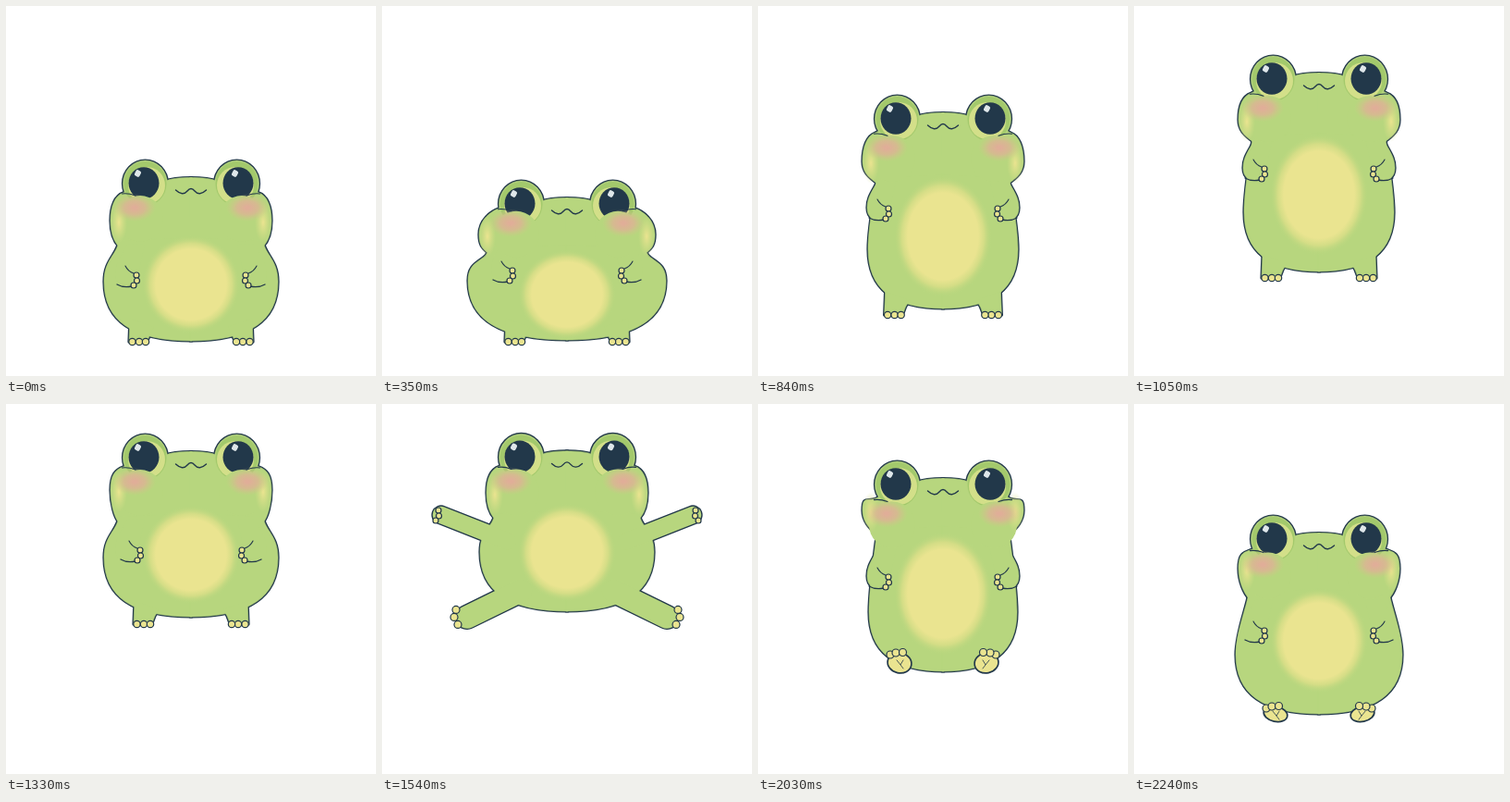
These frames come from a looping animation (400 px wide and 400 px high, 2.31 s). An HTML page:

```html
<!DOCTYPE html>
<html lang="en">
<head>
<meta charset="utf-8">
<title>Jumping frog</title>
<style>
html, body { margin: 0; width: 100%; height: 100%; overflow: hidden; background: #fff; }
svg { display: block; width: 100vw; height: 100vh; }
</style>
</head>
<body>
<svg viewBox="0 0 400 400" stroke-linecap="round" stroke-linejoin="round">
  <defs>
    <radialGradient id="belly">
      <stop offset=".72" stop-color="#eae490"/>
      <stop offset=".84" stop-color="#d4dd86"/>
      <stop offset="1" stop-color="#b7d67e" stop-opacity="0"/>
    </radialGradient>
    <radialGradient id="blush">
      <stop offset=".1" stop-color="#e0ae98"/>
      <stop offset=".5" stop-color="#dcb494" stop-opacity=".8"/>
      <stop offset="1" stop-color="#d2c489" stop-opacity="0"/>
    </radialGradient>
    <radialGradient id="glow">
      <stop offset="0" stop-color="#ebe490"/>
      <stop offset="1" stop-color="#d8df88" stop-opacity="0"/>
    </radialGradient>
  </defs>
  <g id="frog"></g>
</svg>
<script>
const LOOP = 2310, STEP = 70;
const INK = '#22384a', GREEN = '#b7d67e', CREAM = '#eae490';
const frog = document.getElementById('frog');

// time, eye top, cheek y, neck y, body half width, body bottom, belly y, hand y, foot y
const poses = [
  [70, 167, 232, 260, 94, 362, 301, 296, 363],
  [350, 189, 247, 268, 107, 361, 312, 291, 363],
  [560, 198, 255, 274, 119, 362, 317, 292, 364],
  [700, 146, 217, 244, 92, 361, 293, 272, 363],
  [770, 119, 190, 215, 84, 347, 270, 246, 352],
  [840, 97, 168, 192, 81, 327, 249, 224, 334],
  [1050, 54, 123, 147, 81, 287, 204, 181, 294],
  [1330, 33, 93, 128, 94, 230, 163, 163, 238],
  [1680, 32, 98, 122, 94, 220, 159, 155, 222],
  [1750, 38, 105, 125, 94, 221, 162, 155, 213],
  [2030, 62, 115, 142, 80, 289, 205, 192, 269],
  [2170, 97, 151, 182, 85, 322, 238, 227, 315],
  [2240, 121, 178, 210, 90, 335, 256, 250, 327]
];

const mix = (a, b, k) => a + (b - a) * k;

function poseAt(t) {
  if (t <= poses[0][0]) return poses[0];
  const i = poses.findIndex(row => row[0] >= t);
  const a = poses[i - 1], b = poses[i];
  const k = (t - a[0]) / (b[0] - a[0]);
  return a.map((v, n) => mix(v, b[n], k));
}

const ellipse = (x, y, rx, ry, style) =>
  `<ellipse cx="${x}" cy="${y}" rx="${rx}" ry="${ry}" ${style}/>`;
const path = (d, style) => `<path d="${d}" ${style}/>`;
const line = (d, w = 1.3) => path(d, `fill="none" stroke="${INK}" stroke-width="${w}"`);
const toe = (x, y, r) =>
  ellipse(x, y, r, r, `fill="${CREAM}" stroke="${INK}" stroke-width="1.2"`);
const bothSides = s => s + `<g transform="matrix(-1 0 0 1 400 0)">${s}</g>`;

function draw(t) {
  const [, top, cheekY, neckY, wide, bottom, bellyY, hand, foot] = poseAt(t);
  const squash = wide - 94;
  const cheek = 87 + Math.max(0, squash) * .62;
  const bellyH = 43 - squash * (squash < 0 ? .95 : .35);

  // limbs fly out at the top of the jump
  const flying = t > 1330 && t < 1750;
  const arm = flying ? Math.sin(Math.PI * (t - 1330) / 420) : 0;
  const leg = flying ? Math.min(1, (t - 1330) / 180) : 0;

  const brow = top + 18.5, lid = top + 38 - squash * .4;
  const cx = 200 - cheek, bx = 200 - wide, nx = 122 - squash * .5;
  const wy = bottom - 64;
  const hx = t > 1260 && t < 1820 ? 4 : 0;
  const soles = t >= 1750;

  const handX = mix(140 + hx, 60, arm), handY = mix(hand, 120, arm);
  const standX = 144 + 5 * Math.min(1, Math.max(0, (363 - foot) / 40));
  const footX = mix(soles ? 149 : standX, 88, leg), footY = foot + leg * 2;

  const head = `M201 ${brow}C186 ${brow} 178 ${brow + 1} 172 ${brow + 4}L150 ${brow + 10}
    L126.5 ${lid - 3}C118 ${lid} ${cx} ${cheekY - 16} ${cx} ${cheekY}
    C${cx} ${cheekY + 14} ${nx - 5} ${neckY - 5} ${nx} ${neckY}L201 ${neckY + 10}Z`;
  const body = `M${nx} ${neckY - 6}C${nx - 2} ${neckY + 9} ${bx} ${wy - 24} ${bx} ${wy}
    C${bx} ${wy + 42} ${200 - wide * .68} ${bottom} 201 ${bottom}V${neckY - 10}Z`;
  const tuckedArm = `M131 ${hand - 38}C124 ${hand - 24} 118 ${hand - 18} 118 ${hand - 6}
    C118 ${hand + 6} 126 ${hand + 9} 140 ${hand + 7}L150 ${hand - 38}Z`;
  const standLeg = `M${footX - 10} ${footY - 25}L${footX - 11} ${footY}L${footX + 9} ${footY - 1}
    Q${footX + 11} ${footY - 8} ${footX + 16} ${footY - 16}Z`;

  function silhouette(color, edge) {
    const fill = `fill="${color}" stroke="${color}" stroke-width="${edge}"`;
    const limb = w => `fill="none" stroke="${color}" stroke-width="${w + edge}"`;
    let s = ellipse(150.5, top + 25, 24, 25, fill) + path(head, fill) + path(body, fill);
    s += arm > 0
      ? path(`M136 ${neckY + 24}L${handX + 4} ${handY}`, limb(18))
      : path(tuckedArm, fill);
    if (leg > 0) s += path(`M150 ${bottom - 22}L${footX + 4} ${footY}`, limb(24));
    else if (!soles) s += path(standLeg, fill);
    return bothSides(s);
  }

  let s = ellipse(150.5, top + 25, 23, 24, 'fill="#a3c96c"')
    + ellipse(152, top + 27, 20, 20, 'fill="#d3df89"')
    + ellipse(149, top + 24.5, 16.5, 17.3, `fill="${INK}"`)
    + ellipse(145, lid + 25, 25, 25, `fill="${GREEN}"`)
    + ellipse(cx + 9, cheekY + 2, 9, 22, 'fill="url(#glow)"')
    + ellipse(139, lid + 13, 23, 15, 'fill="url(#blush)"')
    + line(`M125.5 ${lid - 2}Q132 ${lid - 3} 140 ${lid}`, 1.1);

  if (arm === 0) {
    s += line(`M${120 + hx} ${hand + 5}Q${127 + hx} ${hand + 9} ${136 + hx} ${hand + 7}`)
      + line(`M${129 + hx} ${hand - 15}Q${132 + hx} ${hand - 9} ${138 + hx} ${hand - 7}`, 1.1);
  }
  s += toe(handX + 1, handY - 5, 3) + toe(handX + 1.5, handY + 1, 3) + toe(handX - 2, handY + 6, 3);

  if (leg > 0) {
    s += toe(footX - 8, footY - 8, 4) + toe(footX - 10, footY, 4) + toe(footX - 6, footY + 8, 4);
  } else if (soles) {
    const plump = 7 - squash * .28;
    const sy = footY + plump;
    s += `<g transform="rotate(12 ${footX + 4} ${sy})">`
      + ellipse(footX + 4, sy, 13, plump, `fill="${CREAM}" stroke="${INK}" stroke-width="1.7"`)
      + '</g>';
    if (plump > 8) {
      s += line(`M${footX + 1} ${sy - 3}l4 5l3 -5m-3 5l3 4`, .8);
    }
    s += toe(footX - 6, footY + 2, 4) + toe(footX, footY, 4) + toe(footX + 7.5, footY - .5, 4);
  } else {
    s += [-7.5, 0, 7].map(d => toe(footX + d, footY, 3.7)).join('');
  }

  const shine = x => `<rect x="${x - 3}" y="${top + 10.5}" width="6" height="7" rx="2"
    fill="#dfe7ea" transform="rotate(28 ${x} ${top + 14})"/>`;
  const my = top + 33;
  frog.innerHTML = silhouette(INK, 3.2) + silhouette(GREEN, .5)
    + ellipse(200, bellyY, 53, bellyH + 10, 'fill="url(#belly)"')
    + bothSides(s) + shine(142.5) + shine(247.5)
    + line(`M183.5 ${my - 1}Q191 ${my + 6} 196 ${my}Q200 ${my - 5} 204 ${my}Q209 ${my + 6} 216.5 ${my - 1}`, 1.4);
}

const start = performance.now();
let shown = -1;

function tick() {
  const elapsed = Math.max(0, performance.now() - start) % LOOP;
  let t = Math.floor(elapsed / STEP) * STEP;
  if (t === 490) t = 420; // the crouch is held
  if (t !== shown) draw(shown = t);
  requestAnimationFrame(tick);
}
tick();
</script>
</body>
</html>
```
